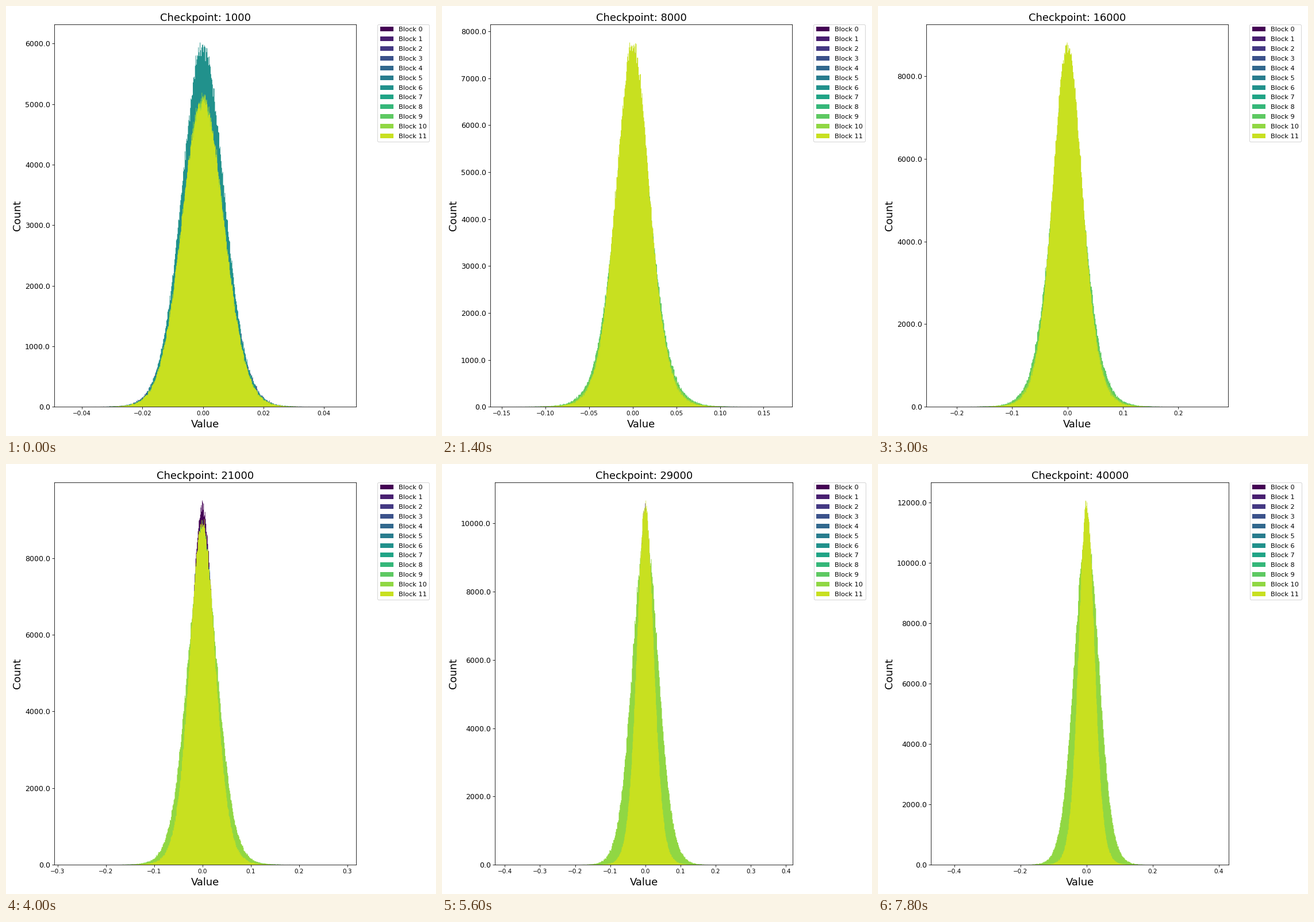
Write a matplotlib script that moves like this. It is 748x748 px and loops after 8000 ms.

```python
import numpy as np
import matplotlib.pyplot as plt
from matplotlib.animation import FuncAnimation
from matplotlib.patches import Patch
from matplotlib.ticker import FormatStrFormatter

SIZE = 748
FRAMES = 40
WEIGHTS = 768 * 768
BIG = 17.2

# Key points of the view: frame, tallest bar, left and right limit.
VIEW = np.array([
    (0, 6017, -.0491, .0507),
    (7, 7759, -.1632, .1829),
    (15, 8811, -.2549, .2902),
    (20, 9500, -.3065, .3184),
    (28, 10670, -.4280, .4198),
    (34, 11308, -.4438, .4286),
    (39, 12073, -.4709, .4309),
])

plt.rcParams["font.family"] = "DejaVu Sans"
fig = plt.figure(figsize=(10, 10), dpi=SIZE / 10, facecolor="white")
ax = fig.add_axes([0.1, 0.1, 0.7, 0.8])


def color(block):
    return plt.cm.viridis(block / 12)


def view(i):
    return [np.interp(i, VIEW[:, 0], col) for col in VIEW.T[1:]]


def ramp(i, start, end, power=1):
    return 1 - (1 - np.clip((i - start) / (end - start), 0, 1)) ** power


def bump(i, center):
    return np.exp(-((i - center) / 4) ** 2)


def curves(i):
    """Relative peak, spread and tail exponent of each block that shows."""
    fresh = np.exp(-i / 2)
    early = ramp(i, 0, 15, 1.5)
    late = ramp(i, 15, 28)
    base = .0069 + .0194 * early - .0029 * ramp(i, 18, 28)
    tail = 6 + 9 * fresh
    return {
        0: (.93 + .045 * bump(i, 20) - .1 * fresh, .91 * base, tail),
        1: (.93 + .03 * bump(i, 28) - .1 * fresh, .93 * base, tail),
        3: (.88, 1.02 * base, tail),
        6: (.92 + .055 * fresh, base, tail),
        9: (.83, .0068 + .0229 * early, tail),
        10: (.83 + .06 * late, .0068 + .0215 * early + .0088 * late,
             tail + 5 * late),
        11: (.97 - .14 * fresh - .04 * bump(i, 20), base, tail),
    }


def histogram(peak, spread, tail, lo, hi, rng):
    width = 2.6 * peak * spread / WEIGHTS
    edges = np.arange(lo, hi, width)
    z = (edges[:-1] + width / 2) / spread
    mean = peak * (1 + z * z / (2 * tail)) ** -tail
    return rng.poisson(mean), edges


def place_axes(wide_labels):
    left, right = (92.2, 610.4) if wide_labels else (84.2, 609.4)
    top, bottom = 31.9, 697.2
    ax.set_position([left / SIZE, 1 - bottom / SIZE,
                     (right - left) / SIZE, (bottom - top) / SIZE])


steps = {b: ax.stairs([1], [0, 1], fill=True, color=color(b), lw=0, snap=False)
         for b in curves(0)}
title = ax.set_title("", fontsize=BIG)
ax.set_xlabel("Value", fontsize=BIG)
ax.set_ylabel("Count", fontsize=BIG)
ax.tick_params(axis="y", labelsize=12)
ax.yaxis.set_major_formatter(FormatStrFormatter("%.1f"))
ax.legend(handles=[Patch(color=color(b), lw=0, label=f"Block {b}")
                   for b in range(12)],
          fontsize=11, labelspacing=.6, loc="upper left",
          bbox_to_anchor=(1.07, 1), borderaxespad=0)


def draw(i):
    rng = np.random.default_rng(100 + i)
    top, lo, hi = view(i)
    margin = (hi - lo) / 22
    data = {b: histogram(peak * top, spread, tail, lo + margin, hi - margin, rng)
            for b, (peak, spread, tail) in curves(i).items()}
    scale = top / max(counts.max() for counts, _ in data.values())
    for b, (counts, edges) in data.items():
        steps[b].set_data(counts * scale, edges, 0)
    ax.set_xlim(lo, hi)
    ax.set_ylim(0, top * 1.05)
    place_axes(top * 1.05 >= 10000)
    title.set_text(f"Checkpoint: {1000 * (i + 1)}")
    return list(steps.values())


anim = FuncAnimation(fig, draw, frames=FRAMES, interval=200,
                     repeat=True, repeat_delay=0, blit=False)
plt.show()
```
